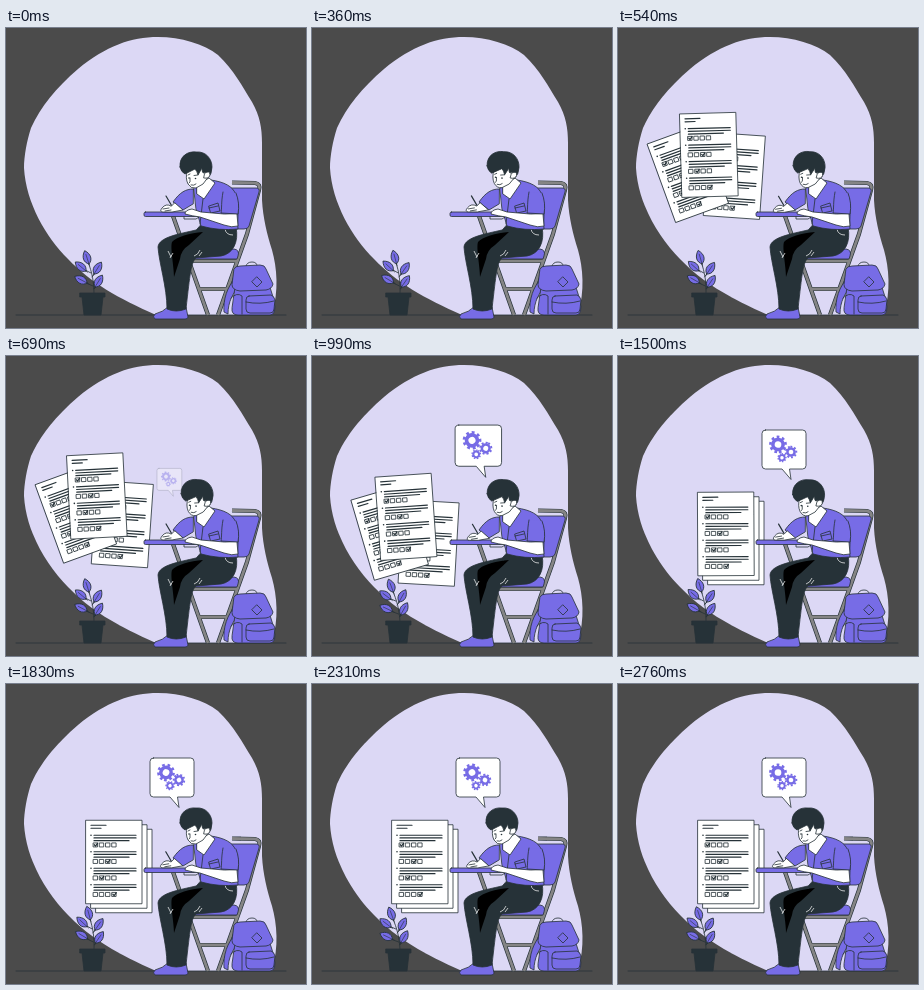
An HTML page that plays this animation: 300x300 px, repeating every 2.79 s.

```html
<!DOCTYPE html>
<html lang="en">
<head>
<meta charset="utf-8">
<title>Studying</title>
<style>
html, body { margin: 0; width: 100%; height: 100%; overflow: hidden; background: #4b4b4b; }
svg { display: block; width: 100vw; height: 100vh; }
.ink { stroke: #263238; stroke-width: .8; stroke-linejoin: round; stroke-linecap: round; }
.thick { stroke-width: 1.2; }
.p { fill: #776ce6; }
.w { fill: #fff; }
.d { fill: #263238; }
.n { fill: none; }
.tube { fill: none; stroke: #858585; stroke-width: 2.8; stroke-linejoin: round; }
.rim { stroke: #263238; stroke-width: 4.2; }
</style>
</head>
<body>
<svg viewBox="0 0 300 300">
  <defs>
    <g id="leaf"><path class="p ink" d="M0 0C-5 -3 -5 -9 0 -14C5 -9 5 -3 0 0Z"/><path class="n ink" stroke-opacity=".7" d="M0 2V-10"/></g>
    <g id="gear" fill="none" stroke="#776ce6">
      <circle r=".58" stroke-width=".4"/>
      <circle r=".86" stroke-width=".3" pathLength="16" stroke-dasharray="1"/>
    </g>
    <path id="frame" d="M167 188L202 287M226 154.500L249 155Q255 156 253 162L241 206L212 287M167 233H232M192 261H221"/>
  </defs>

  <path fill="#dcd8f5" d="M152 9C175 9 198 16 212 27C228 42 236 58 246 74C254 88 256 100 256 115V172C257 190 261 206 266 222C271 240 273 262 266 287H150C112 270 85 255 62 231C40 209 20 175 18 140C18 128 21 112 25 100C35 78 50 60 72 41C100 18 125 9 152 9Z"/>
  <path class="ink" d="M10 287H280"/>

  <g id="sheets"></g>

  <g id="bubble">
    <path class="w ink" d="M147.500 74H184.500Q188 74 188 77.500V109.500Q188 113 184.500 113H171.500L173 123.500L164 113H147.500Q144 113 144 109.500V77.500Q144 74 147.500 74Z"/>
    <g transform="translate(160 88.500) scale(8.800)"><use class="gear" href="#gear"/></g>
    <g transform="translate(173 96) scale(6.200)"><use class="gear" href="#gear"/></g>
    <g transform="translate(164 101.700) scale(4.600)"><use class="gear" href="#gear"/></g>
  </g>

  <g id="plant">
    <path class="n ink" d="M88 266C88 254 86 244 82 234M88 261L91 258M87 258L80 255M86 249L89 245M85 245L79 242"/>
    <use href="#leaf" transform="translate(83 236) rotate(-18)"/>
    <use href="#leaf" transform="translate(88 246) rotate(32)"/>
    <use href="#leaf" transform="translate(80 243) rotate(-50)"/>
    <use href="#leaf" transform="translate(81 255) rotate(-62)"/>
    <use href="#leaf" transform="translate(89 259) rotate(32)"/>
  </g>
  <path class="d ink" d="M74 265H99V269H97L95 287H78L76 269H74Z"/>

  <g id="chair">
    <use class="tube rim" href="#frame"/>
    <use class="tube" href="#frame"/>
    <path class="p ink" d="M224 160H250Q254 160 253 164L243 198Q242 201 238 201H224Z"/>
    <path class="p ink" d="M168 228Q169 221 178 221H228Q234 222 232 228L231 231H169Z"/>
  </g>

  <g id="bag">
    <path class="n ink" d="M240 238Q241 234 246 234Q251 234 251 238"/>
    <path class="p ink" d="M230 250C221 258 217 272 218 284L222 286C222 274 227 264 234 258Z"/>
    <path class="p ink" d="M230 255L262 253L268 272Q271 287 264 287H232Q225 287 226 280Z"/>
    <path class="p ink" d="M228 241Q229 238 234 238L254 237Q259 237 260 241L267 256Q266 261 260 262L234 263Q226 262 226 257Z"/>
    <path class="p ink" d="M251 249L256 254L251 259L246 254Z"/>
    <path class="p ink" d="M243 268L265 267Q268 268 269 272L268 281Q268 285 264 285H244Q240 285 240 281V272Q240 268 243 268Z"/>
    <path class="n ink" d="M240 274Q254 277 268 273M225 270Q231 264 236 268V286"/>
  </g>

  <g id="legs">
    <path class="p ink" d="M162 279L180 279L182 289Q182 291 179 291H149Q146 289 149 286Q157 284 162 279Z"/>
    <path class="d ink" d="M195 197L230 199C233 214 227 226 215 228L190 230C185 234 184 246 180 281Q170 285 161 281C161 259 153 235 152 219C153 209 173 206 190 202Z"/>
    <path d="M197 204C184 205 170 209 166 214C164 220 168 238 168 249L174 231Q175 222 183 217Z"/>
    <path class="n" stroke="#fff" stroke-width=".7" d="M219 201Q220 207 227 207M162 223L165 229M167 225L164 230M188 228Q192 227 194 222M193 228L196 224"/>
  </g>

  <g id="torso">
    <path class="p ink" d="M187 161C180 161 174 164 167 174L177 182L187 176Z"/>
    <path class="p ink" d="M188 160L205 152C218 154 227 158 230 167C234 179 231 189 232 201Q213 203 195 198L190 181Z"/>
    <path class="w ink" d="M191 157L203 150L209 155L198 171L191 166Z"/>
    <path class="n ink" d="M197 171L194 196M203 178L212 175L214 183L205 185ZM203 180L212 178"/>
  </g>

  <g id="head">
    <path class="w ink" d="M181 143C180 148 180 152 182 156Q185 161 190 160L197 156L203 148L200 137Z"/>
    <path class="d ink" d="M174 139C173 128 182 123 190 124C200 123 206 131 206 139Q206 146 202 150L199 144Q196 147 196 140L192 147Q191 143 189 141L179 146Q175 144 174 139Z"/>
    <path class="w ink" d="M199 145Q204 142 204 147Q203 151 198 150Z"/>
    <path class="n ink" d="M182 147L184 146M188 147.500L192 147M184 150V154L183 155M185 157Q188 158 190 156"/>
    <circle class="d" cx="183" cy="150" r=".8"/><circle class="d" cx="189.500" cy="150.500" r=".8"/>
  </g>

  <rect class="p ink" x="138" y="184" width="56" height="4.500" rx="1.500"/>
  <path class="n ink" d="M178 189V191H190L193 189"/>
  <path class="w ink" d="M231 186L232 198Q226 200 218 197L194 189Q186 188 179 186Q179 182 186 181L195 184L218 186Z"/>
  <path class="p ink" d="M217 164C215 175 216 180 215 185L232 186Q234 175 230 165"/>
  <g id="hand">
    <path class="ink thick" d="M160 168L167 180"/>
    <path class="w ink" d="M169 175L177 182L166 184H157Q153 184 156 180Q160 175 165 178Z"/>
    <path class="n ink" d="M157 181L163 180M159 183L165 182"/>
  </g>
</svg>
<script>
const LOOP = 2790;
const $ = id => document.getElementById(id);
const place = (el, value) => el.setAttribute('transform', value);

const ramp = (t, from, to) => Math.min(1, Math.max(0, (t - from) / (to - from)));
const smooth = (t, from, to) => { const u = ramp(t, from, to); return u * u * (3 - 2 * u); };
const backOut = u => 1 + 2.7 * (u - 1) ** 3 + 1.7 * (u - 1) ** 2;

// Back to front: how far each sheet starts from its place in the stack
const sheets = [
  { dx: -1.5, drop: 66, tilt: 4, swing: 0 },
  { dx: -43, drop: 52, tilt: -20, swing: 0 },
  { dx: -17, drop: 66, tilt: 0, swing: -4 }
];

function sheetMarkup() {
  const line = (x, y, w) => `<path class="ink thick" d="M${x} ${y}h${w}"/>`;
  let s = '<rect class="w ink" width="56" height="83.500"/>' + line(5, 5, 15) + line(5, 8, 10);
  [0, 2, 1, 3].forEach((tick, row) => {
    const y = 15 + row * 16.5;
    s += `<circle class="d" cx="5" cy="${y}" r=".8"/>` + line(8, y, 42) + line(8, y + 2.7, 42) + line(8, y + 5.4, 35);
    for (let i = 0; i < 4; i++) {
      const x = 7.5 + i * 6.2;
      s += `<rect class="w ink" x="${x}" y="${y + 7.7}" width="4" height="4"/>`;
      if (i === tick) s += `<path class="n ink thick" d="M${x + .8} ${y + 9.5}l1.200 1.300l2.200 -3"/>`;
    }
  });
  return s;
}
$('sheets').innerHTML = sheets.map(() => `<g>${sheetMarkup()}</g>`).join('');
const gears = document.querySelectorAll('.gear');

function draw(t) {
  const turn = 2 * Math.PI * t / LOOP;

  // Sheets land one after another, then slide together
  const apart = 1 - smooth(t, 800, 1500);
  $('sheets').setAttribute('opacity', ramp(t, 390, 540));
  sheets.forEach(({ dx, drop, tilt, swing }, i) => {
    const fall = ramp(t, 390, 990 + 270 * i);
    const x = 118 - 5 * i + dx * apart;
    const y = 187 - 4.5 * i - drop * (1 - fall) ** 1.8;
    const angle = tilt * apart + swing * Math.sin(Math.PI * fall);
    place($('sheets').children[i], `translate(${x} ${y}) rotate(${angle}) translate(-28 -41.75)`);
  });

  $('bubble').setAttribute('opacity', ramp(t, 640, 790));
  place($('bubble'), `translate(160 162) scale(${backOut(ramp(t, 620, 1100))}) translate(-160 -162)`);
  gears.forEach((gear, i) => place(gear, `rotate(${(i ? -180 : 180) * t / LOOP})`));

  place($('head'), `rotate(${3 * (smooth(t, 0, 420) - smooth(t, 1260, 1770))} 197 160)`);
  place($('plant'), `rotate(${3 * Math.sin(turn * 2)} 87 266)`);
  place($('hand'), `translate(${.6 * Math.sin(turn * 6)} ${.3 * Math.sin(turn * 12)})`);
}

const start = performance.now();
function tick() {
  draw((performance.now() - start) % LOOP);
  requestAnimationFrame(tick);
}
tick();
</script>
</body>
</html>
```
